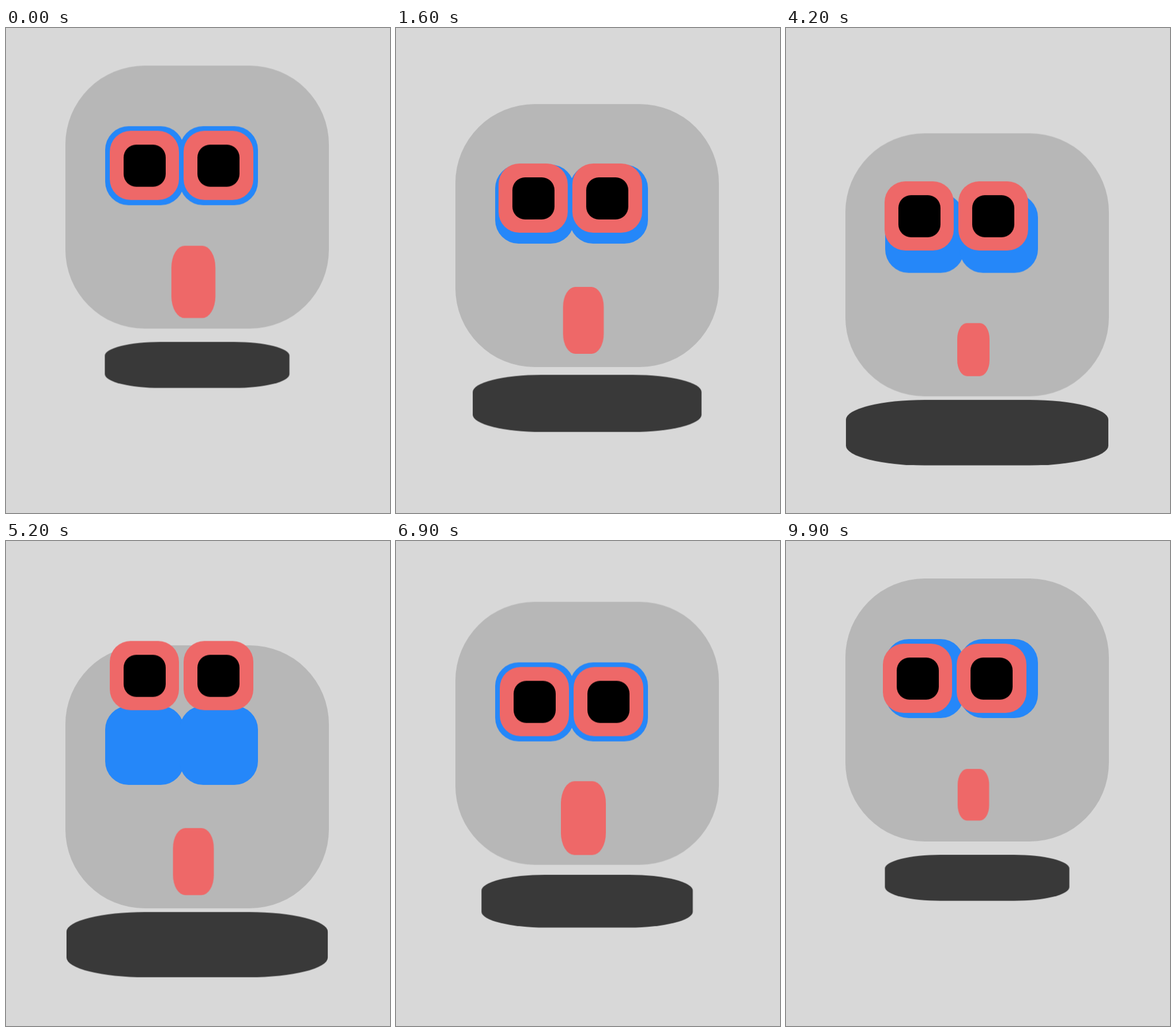
An HTML page that plays this animation: 666 by 841 pixels, repeating every 10 s.

```html
<!DOCTYPE html>
<html lang="en">
<head>
<meta charset="utf-8">
<title>Floating robot head</title>
<style>
  html, body { margin: 0; width: 100%; height: 100%; overflow: hidden; background: #d8d8d8; }
  div { position: absolute; border-radius: 30%; }
  #head { left: 103.3px; top: 64.8px; width: 457px; height: 456.7px; background: #b7b7b7; }
  #shadow { left: 103.3px; top: 526.6px; width: 457px; height: 114.2px; background: #393939; }
  .socket { left: 68.9px; top: 105.6px; width: 136.5px; height: 136.5px; background: #2587f9; }
  .socket + .socket { left: 197.3px; }
  .eye { left: 7.7px; top: 7.4px; width: 120.6px; height: 120.6px; background: #ee6868; }
  .pupil { left: 23.8px; top: 23.9px; width: 73px; height: 73.8px; background: #000; }
  #mouth { left: 183.2px; top: 311px; width: 78px; height: 128.4px; background: #ee6868; }
</style>
</head>
<body>
<div id="shadow"></div>
<div id="head">
  <div class="socket"><div class="eye"><div class="pupil"></div></div></div>
  <div class="socket"><div class="eye"><div class="pupil"></div></div></div>
  <div id="mouth"></div>
</div>
<script>
  const LOOP = 10000, STEP = 100;
  const DROP = 119.3;
  const players = [];

  // steps: [percent, transform]; every segment eases on its own
  function play(selector, period, start, steps) {
    const frames = steps.map(([at, transform]) => ({ offset: at / 100, transform, easing: 'ease' }));
    for (const el of document.querySelectorAll(selector)) {
      const anim = el.animate(frames, { duration: period, iterations: Infinity });
      anim.pause();
      players.push({ anim, start });
    }
  }

  const there = (a, b) => [[0, a], [50, b], [100, a]];
  const look = (x, y) => `translate(${x}%, ${y}%)`;

  play('#head', 10000, 25, there('translateY(0px)', `translateY(${DROP}px)`));
  play('#shadow', 10000, 25, there('translateY(0px) scale(0.7)', `translateY(${DROP}px) scale(1)`));
  play('#mouth', 6000, 2025, there('scale(0.7)', 'scale(1)'));
  play('.eye', 6000, 2025, [
    [0, look(-10, 0)],
    [21, look(0, -100)],
    [33, look(0, 0)],
    [49, look(0, 0)],
    [55, look(-10, 0)],
    [65.4, look(0, -10)],
    [76, look(0, -10)],
    [83, look(0, 10)],
    [88, look(0, 10)],
    [100, look(-10, 0)]
  ]);

  const begin = performance.now();
  function draw() {
    const now = Math.max(0, performance.now() - begin) % LOOP;
    const t = Math.floor(now / STEP) * STEP;
    for (const { anim, start } of players) anim.currentTime = start + t;
    requestAnimationFrame(draw);
  }
  draw();
</script>
</body>
</html>
```
